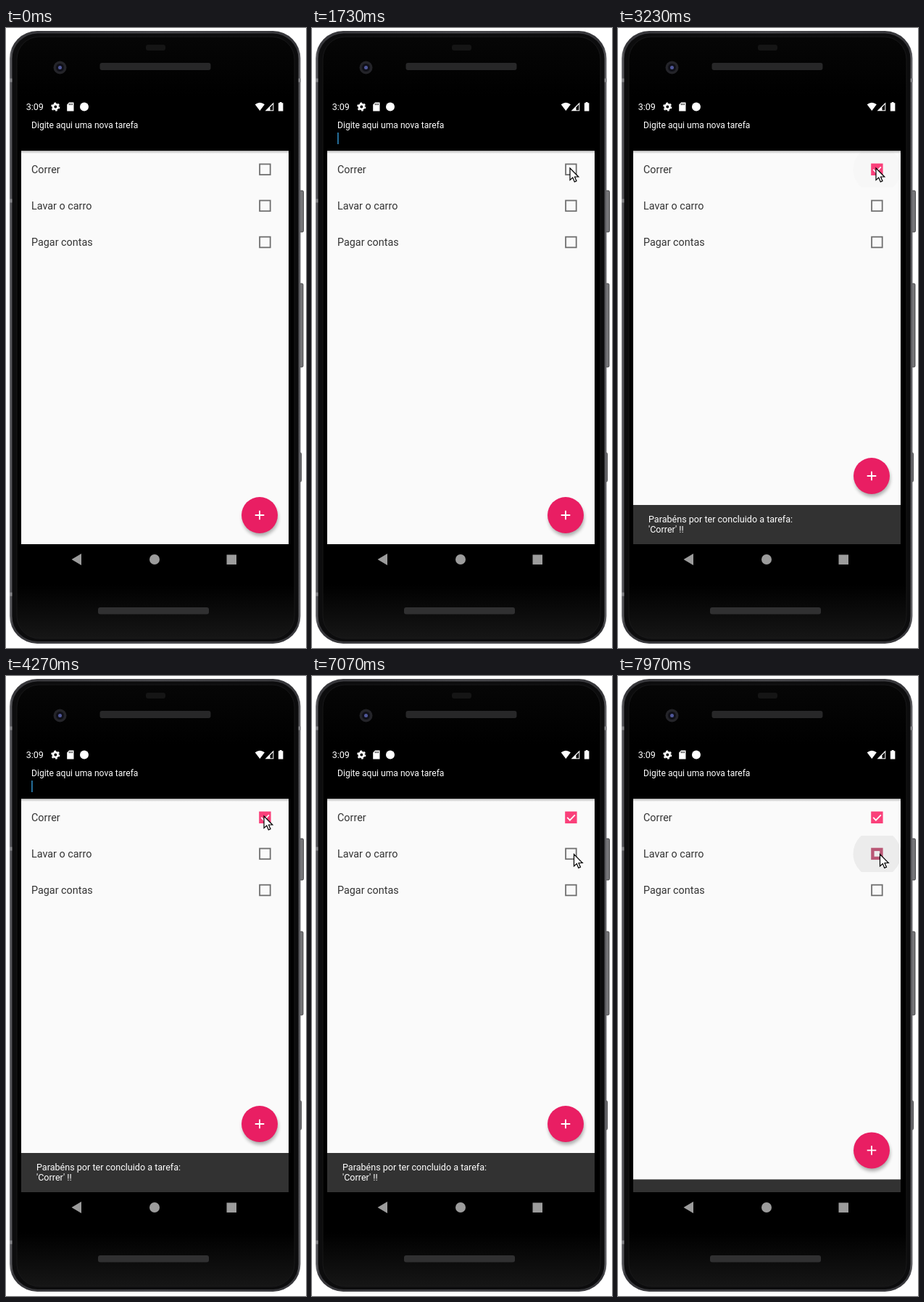
Write an HTML page that moves like this. It is 414 px wide and 854 px high and loops after 8 s.

```html
<!DOCTYPE html>
<html lang="pt">
<head>
<meta charset="utf-8">
<title>Lista de tarefas</title>
<style>
html, body { margin: 0; width: 100%; height: 100%; overflow: hidden; background: #fff; }
svg { display: block; width: 100%; height: 100%; }
text { font-family: Roboto, sans-serif; white-space: pre; }
</style>
</head>
<body>
<svg viewBox="0 0 414 854">
  <defs>
    <linearGradient id="rim">
      <stop offset="0" stop-color="#6c6c70"/><stop offset=".012" stop-color="#36363a"/>
      <stop offset=".5" stop-color="#48484c"/>
      <stop offset=".988" stop-color="#36363a"/><stop offset="1" stop-color="#6c6c70"/>
    </linearGradient>
    <linearGradient id="glass" x2="0" y2="1">
      <stop offset="0" stop-color="#060606"/><stop offset=".1" stop-color="#000"/>
      <stop offset=".91" stop-color="#000"/><stop offset="1" stop-color="#161616"/>
    </linearGradient>
    <linearGradient id="barShadow" x2="0" y2="1">
      <stop offset="0" stop-opacity=".28"/><stop offset="1" stop-opacity="0"/>
    </linearGradient>
    <filter id="blur" x="-50%" y="-50%" width="200%" height="200%"><feGaussianBlur stdDeviation="2.6"/></filter>
    <clipPath id="list"><rect x="21" y="169" width="369" height="542"/></clipPath>
  </defs>

  <!-- phone body -->
  <g fill="#77777a" stroke="#29292b" stroke-width=".8">
    <rect x="402" y="224" width="8.5" height="57" rx="1.5"/>
    <rect x="402" y="352" width="8" height="115" rx="1.5"/>
    <rect x="402" y="585" width="5.5" height="40" rx="1.5"/>
  </g>
  <rect x="5" y="4" width="401.5" height="844" rx="38" fill="url(#rim)"/>
  <path d="M5 72h4M403 72h4M5 238h4M5 780h4" stroke="#88888c" stroke-width="5"/>
  <rect x="8.500" y="7.500" width="395" height="837.500" rx="35" fill="#0c0c0d"/>
  <rect x="15" y="12" width="383" height="829" rx="31" fill="url(#glass)" stroke="#1c1c1e" stroke-width=".8"/>
  <rect x="129.500" y="48" width="153" height="10" rx="3" fill="#272728"/>
  <rect x="127" y="798" width="153" height="9.500" rx="3" fill="#303031"/>
  <rect x="193" y="23" width="27" height="8" rx="3" fill="#151515"/>
  <circle cx="74.500" cy="54.500" r="9" fill="#242429"/>
  <circle cx="74.500" cy="54.500" r="5.500" fill="#101018"/>
  <circle cx="74.500" cy="54.500" r="2.500" fill="#50589a"/>
  <rect x="21" y="97" width="369" height="660"/>

  <!-- status bar -->
  <g fill="#fff">
    <text x="27.700" y="113.300" font-size="12.570">3:09</text>
    <circle cx="68.300" cy="108.500" r="3.300" fill="none" stroke="#fff" stroke-width="2.800"/>
    <circle cx="68.300" cy="108.500" r="5.200" fill="none" stroke="#fff" stroke-width="1.800" stroke-dasharray="2.700 2.745"/>
    <path d="M87 102.500h6.500v12h-9.300v-9z"/>
    <path d="M87.300 104v2.200M89.300 104v2.200M91.300 104v2.200" stroke="#000" stroke-width=".9"/>
    <circle cx="108" cy="108.500" r="6"/>
    <path d="M343.700 105.200q6.600-5 13.200 0L350.300 114z"/>
    <path d="M369.300 102.500v11.700h-11.700z"/>
    <path d="M364.500 109.200v4h3.800v-8z" fill="#000"/>
    <path d="M377.700 102h2.800v1.300h1.900v11.200h-6.500v-11.200h1.800z"/>
    <text x="35" y="138.200" font-size="12.100">Digite aqui uma nova tarefa</text>
  </g>
  <rect id="caret" x="35" y="144" width="1.800" height="16" fill="#2878a8"/>

  <!-- app content -->
  <g clip-path="url(#list)">
    <rect x="21" y="169" width="369" height="542" fill="#fafafa"/>
    <g id="rows"></g>
    <rect x="21" y="169" width="369" height="4" fill="url(#barShadow)"/>
    <g id="snack">
      <rect x="21" y="657" width="369" height="54" fill="#323232"/>
      <g id="message" fill="#fff" font-size="12.570">
        <text x="42" y="681">Parabéns por ter concluido a tarefa:</text>
        <text x="42" y="695.400">'Correr' !!</text>
      </g>
    </g>
    <g id="fab">
      <circle cx="351" cy="675" r="24.500" opacity=".32" filter="url(#blur)"/>
      <circle cx="350" cy="671" r="25" fill="#e91e63"/>
      <path d="M343.700 671h12.600M350 664.700v12.600" stroke="#fff" stroke-width="1.800"/>
    </g>
  </g>

  <!-- navigation bar -->
  <g fill="#9c9c9c">
    <path d="M90.500 732L104 724v16z"/>
    <circle cx="205" cy="732" r="7"/>
    <rect x="304.500" y="725.500" width="13.500" height="13.500"/>
  </g>
  <path id="pointer" d="M0 0V16.500L3.800 13 6.300 18.900 9 17.700 6.500 12H11.800Z" fill="#fff" stroke="#000" stroke-width="1.200"/>
</svg>
<script>
const LOOP = 8000;
const FIRST_TAP = 2850, SECOND_TAP = 7850, SNACK_DELAY = 13;
const byId = id => document.getElementById(id);
const clamp = x => Math.max(0, Math.min(1, x));
const progress = (t, start, length) => clamp((t - start) / length);
const smooth = x => x * x * (3 - 2 * x);
const mix = (a, b, p) => a + (b - a) * p;

// Material standard curve: cubic-bezier(.4, 0, .2, 1)
function standard(x) {
  let low = 0, high = 1;
  for (let i = 0; i < 18; i++) {
    const s = (low + high) / 2, r = 1 - s;
    if (1.2 * s * r * r + .6 * s * s * r + s ** 3 < x) low = s; else high = s;
  }
  return smooth(low);
}

const tasks = [["Correr", FIRST_TAP], ["Lavar o carro", SECOND_TAP], ["Pagar contas", Infinity]];
const rowY = i => 194.8 + i * 50.1;
byId("rows").innerHTML = tasks.map(([name], i) => {
  const y = rowY(i);
  return `<clipPath id="row${i}"><rect x="21" y="${y - 25}" width="369" height="50"/></clipPath>
    <g clip-path="url(#row${i})"><circle class="ripple" cx="357.5" cy="${y}" fill="#ececec"/></g>
    <text x="35" y="${y + 4.8}" font-size="14.37" fill="#333">${name}</text>
    <rect class="box" fill="none"/>
    <path class="tick" d="M352.2 ${y}l3.7 3.8 7-7.3" fill="none" stroke="#fff" stroke-width="1.8" pathLength="1" stroke-dasharray="1 2"/>`;
}).join("");
const [ripples, boxes, ticks] = ["ripple", "box", "tick"].map(c => document.querySelectorAll("." + c));

function set(node, attributes) {
  for (const key in attributes) node.setAttribute(key, attributes[key]);
}

function drawTask(i, t) {
  const age = t - tasks[i][1], y = rowY(i);
  const fill = progress(age, 0, 190) ** 2;
  const border = mix(1.8, 8.2, fill), size = 16.4 - border;
  const tint = progress(age, 0, 230);
  const color = [[112, 250], [112, 64], [112, 122]].map(([a, b]) => Math.round(mix(a, b, tint)));
  set(boxes[i], {
    x: 357.4 - size / 2, y: y - size / 2, width: size, height: size,
    "stroke-width": border, stroke: `rgb(${color})`
  });
  const drawn = progress(age, 190, 150);
  set(ticks[i], { "stroke-dashoffset": 1 - drawn, opacity: drawn > 0 ? 1 : 0 });
  set(ripples[i], {
    r: 33 * Math.sqrt(progress(age, 0, 120)),
    opacity: 1 - progress(age, 180, 260)
  });
}

// Each stop: departure, arrival, x, y
const stops = [
  [480, 800, 347, 203],
  [900, 1300, 356, 193],
  [4500, 4720, 362, 191],
  [6080, 6500, 361.5, 245.5]
];
function drawPointer(t) {
  let x = 416, y = 290;
  for (const [start, end, toX, toY] of stops) {
    const p = smooth(progress(t, start, end - start));
    x = mix(x, toX, p);
    y = mix(y, toY, p);
  }
  set(byId("pointer"), { transform: `translate(${x} ${y})` });
}

function draw(now) {
  const t = now % LOOP;
  const enter = FIRST_TAP + SNACK_DELAY, leave = SECOND_TAP + SNACK_DELAY;
  const shown = standard(progress(t, enter, 250)) - standard(progress(t, leave, 250));
  set(byId("snack"), { transform: `translate(0 ${54 * (1 - shown)})` });
  set(byId("fab"), { transform: `translate(0 ${-54 * shown})` });
  set(byId("message"), { opacity: progress(t, enter + 70, 180) * (1 - progress(t, leave, 100)) });
  set(byId("caret"), { opacity: t % 1000 >= 250 && t % 1000 < 750 ? 1 : 0 });
  tasks.forEach((_, i) => drawTask(i, t));
  drawPointer(t);
}

const began = performance.now();
function tick() {
  draw(performance.now() - began);
  requestAnimationFrame(tick);
}
tick();
</script>
</body>
</html>
```
